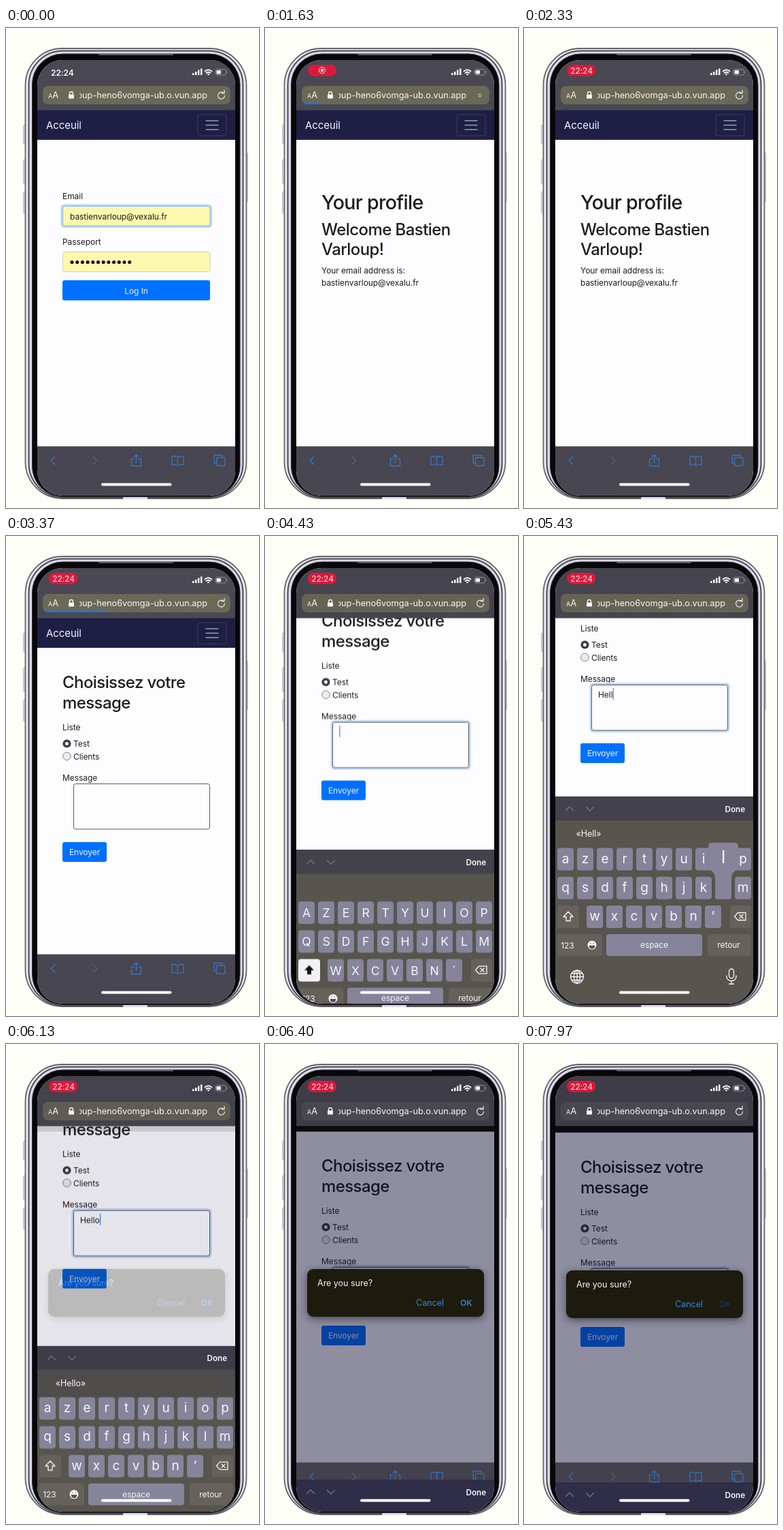
Write an HTML page that moves like this. It is 372 px wide and 704 px high and loops after 8 s.

```html
<!DOCTYPE html>
<html lang="fr">
<head>
<meta charset="utf-8">
<title>Phone demo</title>
<style>
html, body { margin: 0; height: 100%; overflow: hidden; background: #fffffa; }
svg { display: block; width: 100vw; height: 100vh; }
text { font: 12px Inter, "Open Sans", sans-serif; letter-spacing: -.005em; fill: #1e1d1a; }
.h1 { font-size: 28.6px; font-weight: 500; letter-spacing: -.025em; }
.h2 { font-size: 24px; font-weight: 500; letter-spacing: -.024em; }
.white { fill: #f6f5fa; }
.mid { text-anchor: middle; }
.end { text-anchor: end; }
.blue { fill: #3584e4; }
.line { fill: none; stroke-width: 1.3; stroke-linecap: round; stroke-linejoin: round; }
.key { fill: #86849a; }
.dark { fill: #64625a; }
.cap { font-size: 17.5px; text-anchor: middle; }
.low { font-size: 19px; }
.a { animation: 8s linear infinite; }
#head { animation-name: head; }
#pill { animation-name: pill; }
#page { animation-name: scroll; }
#keyboard { animation-name: slide; }
#bar { animation-name: load; }
.fade { animation-name: fade; }
#dialog { animation-name: fade, settle; }
@keyframes scroll {
  0%, 53.1% { transform: translateY(0); animation-timing-function: ease-in; }
  55.375% { transform: translateY(-90px); animation-timing-function: ease-out; }
  58.5%, 75.6% { transform: translateY(-145px); }
  80% { transform: translateY(-36px); }
  82%, 100% { transform: translateY(-34px); }
}
@keyframes slide {
  0%, 53.1% { transform: translateY(322px); }
  55.375% { transform: translateY(79px); animation-timing-function: ease-out; }
  58.5%, 75.6% { transform: translateY(0); }
  80% { transform: translateY(257px); }
  82%, 100% { transform: translateY(261px); }
}
@keyframes settle {
  0%, 80% { transform: translateY(-2px); }
  82%, 100% { transform: translateY(0); }
}
@keyframes fade {
  0%, 76% { opacity: 0; }
  79%, 100% { opacity: 1; }
}
@keyframes head {
  0%, 53.1% { fill: #4a4852; }
  55.375%, 76% { fill: #45434d; }
  79%, 100% { fill: #3e3c47; }
}
@keyframes pill {
  0%, 53.1% { fill: #6a6856; }
  55.375%, 76% { fill: #656354; }
  79%, 100% { fill: #494851; }
}
@keyframes load {
  0%, 17.49% { width: 0; opacity: 0; }
  17.5% { width: 8px; opacity: 1; }
  20.375% { width: 25px; }
  25% { width: 268px; opacity: 1; }
  26%, 38.74% { width: 268px; opacity: 0; }
  38.75% { width: 20px; opacity: 1; }
  42.125% { width: 91px; }
  46% { width: 268px; opacity: 1; }
  47%, 100% { width: 268px; opacity: 0; }
}
</style>
</head>
<body>
<svg viewBox="0 0 372 704">
  <defs>
    <clipPath id="screen"><rect x="46" y="47" width="291" height="639" rx="37"/></clipPath>
    <clipPath id="view"><rect x="46" y="120.5" width="291" height="493"/></clipPath>
    <clipPath id="address"><rect x="108" y="86" width="190" height="26"/></clipPath>
    <clipPath id="pillClip"><rect x="54" y="85" width="276" height="27" rx="8"/></clipPath>
    <filter id="shadow" x="-20%" y="-50%" width="140%" height="200%"><feGaussianBlur stdDeviation="6"/></filter>
  </defs>

  <g id="frame">
    <g fill="#d6d5de" stroke="#a3a2ac" stroke-width=".6">
      <rect x="25.500" y="142" width="3" height="28" rx="1"/>
      <rect x="25.500" y="193" width="3" height="35" rx="1"/>
      <rect x="25.500" y="240" width="3" height="32" rx="1"/>
      <rect x="352.500" y="183" width="3" height="72" rx="1"/>
    </g>
    <rect x="28.500" y="30" width="325" height="660" rx="54" fill="#eeedf4" stroke="#65645f" stroke-width="1.800"/>
    <rect x="33.500" y="33.500" width="315" height="655" rx="50" fill="#d9d8e4" stroke="#4a495a" stroke-width="2"/>
    <rect x="38.500" y="38" width="305.500" height="649.500" rx="45" fill="#08080a" stroke="#2c2b33"/>
    <rect x="136" y="38" width="110" height="2" rx="1" fill="#5c5b60"/>
    <rect x="172" y="688" width="36" height="3" rx="1" fill="#dddcee"/>
  </g>

  <g clip-path="url(#screen)">
    <rect x="46" y="47" width="291" height="639" fill="#fdfcfe"/>

    <g clip-path="url(#view)">
      <g id="page" class="a">
        <rect x="46" y="120" width="291" height="44" fill="#1f1f45"/>
        <text class="white" x="59" y="147.500" style="font-size:15px">Acceuil</text>
        <rect x="282" y="127" width="42" height="31" rx="3" fill="none" stroke="#3d3c58"/>
        <path class="line" stroke="#9c9bab" d="M294 136h18m-18 6.500h18m-18 6.500h18"/>

        <g data-on="0-1400">
          <text x="83" y="250.500">Email</text>
          <rect x="82" y="260" width="219.500" height="31.500" rx="4" fill="none" stroke="#b5d6fb" stroke-width="3"/>
          <rect x="83.500" y="261.500" width="216.500" height="28.500" rx="3" fill="#fcf9ae" stroke="#86b8f4"/>
          <text x="94" y="280.500">bastienvarloup@vexalu.fr</text>
          <text x="83" y="317.500">Passeport</text>
          <rect x="83.500" y="328.500" width="216.500" height="29" rx="3" fill="#fcf9ae" stroke="#d0cfc0"/>
          <g id="dots"></g>
          <rect x="83" y="370" width="217" height="29.500" rx="3" fill="#0070ff"/>
          <text class="white mid" x="191.500" y="389.500">Log In</text>
        </g>

        <g data-on="1400-3100">
          <text class="h1" x="83" y="265.500">Your profile</text>
          <text class="h2" x="83" y="303.500">Welcome Bastien</text>
          <text class="h2" x="83" y="333">Varloup!</text>
          <text x="83" y="359.500">Your email address is:</text>
          <text x="83" y="378">bastienvarloup@vexalu.fr</text>
        </g>

        <g data-on="3100-8000">
          <text class="h2" x="83" y="223">Choisissez votre</text>
          <text class="h2" x="83" y="252.500">message</text>
          <text x="83" y="284.500">Liste</text>
          <circle cx="89.500" cy="304.500" r="4.300" fill="#fff" stroke="#3d3c48" stroke-width="3.600"/>
          <text x="99" y="309">Test</text>
          <circle cx="89.500" cy="323" r="5.800" fill="#ecebf0" stroke="#77767e" stroke-width=".9"/>
          <text x="99" y="327.500">Clients</text>
          <text x="83" y="358.500">Message</text>
          <rect data-on="4200-8000" x="98" y="362" width="203" height="69.500" rx="4" fill="none" stroke="#bcd6f8" stroke-width="3"/>
          <rect x="99.500" y="363.500" width="200" height="66.500" rx="3" fill="#fdfcfe" stroke="#5b5a68"/>
          <g id="typed"></g>
          <rect x="83" y="449" width="65" height="29" rx="3" fill="#0070ff"/>
          <text class="white mid" x="115.500" y="468">Envoyer</text>
        </g>
      </g>
    </g>

    <rect id="head" class="a" x="46" y="47" width="291" height="73.500"/>
    <text data-on="0-450" class="white" x="66" y="69.500" style="font-weight:600">22:24</text>
    <g data-on="450-8000">
      <rect x="63" y="54" width="42" height="16.500" rx="8" fill="#dc193c"/>
      <g data-on="450-2300">
        <circle cx="84" cy="62" r="4.500" fill="none" stroke="#fbe4e8"/>
        <circle cx="84" cy="62" r="2.200" fill="#fbe4e8"/>
      </g>
      <text data-on="2300-8000" x="84.500" y="66.500" class="mid" style="fill:#fbe4e8">22:24</text>
    </g>
    <path d="M274 66h2.500v3h-2.500zM278 64h2.500v5h-2.500zM282 61.500h2.500v7.500h-2.500zM286 59.500h2.500v9.500h-2.500z" fill="#f6f5fa"/>
    <path d="M292.500 63.500q5-4.500 10 0M294.500 66q3-2.500 6 0" class="line" stroke="#f6f5fa" style="stroke-width:1.700"/>
    <circle cx="297.500" cy="68" r="1.300" fill="#f6f5fa"/>
    <rect x="308" y="60.500" width="15.500" height="8.500" rx="2.500" fill="none" stroke="#8d8c94"/>
    <rect x="309.500" y="62" width="6.500" height="5.500" rx="1" fill="#f6f5fa"/>
    <path d="M325 63.500v2.500" stroke="#8d8c94"/>

    <rect id="pill" class="a" x="54" y="85" width="276" height="27" rx="8"/>
    <text class="white" x="62" y="103"><tspan style="font-size:9px">A</tspan><tspan style="font-size:13px">A</tspan></text>
    <path d="M93.500 98v-2a2.500 2.500 0 0 1 5 0v2" class="line" stroke="#f6f5fa"/>
    <rect x="92" y="97.500" width="8" height="6" rx="1" fill="#f6f5fa"/>
    <g clip-path="url(#address)">
      <text class="white end" x="296" y="103" style="font-size:12.800px">bastien-varloup-heno6vomga-ub.o.vun.app</text>
    </g>
    <g class="line" stroke="#e4e3e6">
      <path data-on="0-1400" d="M320.500 96a5 5 0 1 0 1 3.500M317 95.500h4v-4"/>
      <path data-on="1400-1900" d="M317.500 97.500a2 2 0 1 0 .5 1.500" stroke="#b5b4ac"/>
      <path data-on="1900-8000" d="M320.500 96a5 5 0 1 0 1 3.500M317 95.500h4v-4"/>
    </g>
    <g clip-path="url(#pillClip)">
      <rect id="bar" class="a" x="58" y="109.500" width="0" height="2.500" fill="#2273dc"/>
    </g>

    <rect x="46" y="613.500" width="291" height="73" fill="#484650"/>
    <g class="line" stroke="#3676c4">
      <path d="M72 629l-6 5.500 6 5.500"/>
      <path d="M128 629l6 5.500-6 5.500" stroke="#62615d"/>
      <path d="M188 632h-3.500v10.500h14v-10.500h-3.500M191.500 637.500v-11M188.500 629l3-3 3 3"/>
      <path d="M252.500 630q-4-3-8.500-1.500v12.500q4.500-1.500 8.500 1 4-2.500 8.500-1v-12.500q-4.500-1.500-8.500 1.500zv12"/>
      <path d="M309 638h-3v-11.500h12v3"/>
      <rect x="309.500" y="630" width="12.500" height="12" rx="2"/>
    </g>

    <g class="a fade">
      <rect x="46" y="120.500" width="291" height="493" fill="#0a0a32" opacity=".45"/>
      <rect x="46" y="613.500" width="291" height="73" fill="#0a0a20" opacity=".06"/>
      <rect x="46" y="120.500" width="291" height="8" fill="#0c0b0a"/>
    </g>

    <g id="dialog" class="a">
      <rect x="62" y="335" width="260" height="70" rx="9" fill="#151422" opacity=".6" filter="url(#shadow)"/>
      <rect x="62" y="332" width="260" height="70" rx="9" fill="#1d1b0d"/>
      <text class="white" x="77" y="356.500" style="font-size:12.600px">Are you sure?</text>
      <text class="blue" x="222" y="386" style="font-size:12.600px">Cancel</text>
      <text class="blue" data-on="0-7870" x="287" y="386" style="font-weight:600">OK</text>
      <text data-on="7870-8000" x="287" y="386" style="font-weight:600;fill:#1f3357">OK</text>
    </g>

    <g id="keyboard" class="a">
      <rect x="46" y="382" width="291" height="330" fill="#57554d"/>
      <rect x="46" y="382" width="291" height="35" fill="#43414b"/>
      <rect class="a fade" x="46" y="382" width="291" height="75" fill="#2f2d48"/>
      <path class="line" stroke="#77767c" d="M61.500 402.500l5.500-5.500 5.500 5.500M91.500 397.500l5.500 5.500 5.500-5.500"/>
      <text class="white end" x="325" y="404.500" style="font-weight:600;font-size:11.700px">Done</text>
      <g id="keys"></g>
      <g data-on="0-4900">
        <rect x="49" y="542" width="32" height="33" rx="4" fill="#f1f0f5"/>
        <path d="M65 551l7 7.500h-4v6h-6v-6h-4z" fill="#111"/>
      </g>
      <g data-on="4900-8000">
        <rect class="dark" x="49" y="542" width="32" height="33" rx="4"/>
        <path class="line" stroke="#f6f5fa" d="M65 551l7 7.500h-4v6h-6v-6h-4z"/>
      </g>
      <rect class="dark" x="303" y="542" width="31" height="33" rx="4"/>
      <path class="line" stroke="#f6f5fa" d="M309.500 558l5-5.500h11.500v11h-11.500zM317 555.500l5 5m0-5l-5 5"/>
      <rect class="dark" x="49" y="584" width="66" height="32" rx="4"/>
      <rect class="key" x="121" y="584" width="141" height="32" rx="4"/>
      <rect class="dark" x="270" y="584" width="64" height="32" rx="4"/>
      <text class="white mid" x="64" y="604.500">123</text>
      <text class="white mid" x="191.500" y="604">espace</text>
      <text class="white mid" x="301" y="604">retour</text>
      <circle cx="100" cy="600" r="6.500" fill="#f6f5fa"/>
      <path d="M96 601h8a4 4 0 0 1-8 0zM97 597.500h1.500m3 0h1.500" fill="#55534f" stroke="#55534f"/>
      <g class="line" stroke="#f6f5fa">
        <circle cx="78" cy="646.500" r="9.500"/>
        <ellipse cx="78" cy="646.500" rx="4.500" ry="9.500"/>
        <path d="M78 637v19M68.500 646.500h19M70.500 641.500h15m-15 10h15"/>
        <rect x="301.500" y="635" width="7" height="13.500" rx="3.500"/>
        <path d="M298 645v1.500a7 6 0 0 0 14 0v-1.500M305 652.500v4.500m-3.500 0h7"/>
      </g>
      <g id="popups"></g>
    </g>

    <rect x="140" y="667.500" width="103.500" height="4" rx="2" fill="#fff"/>
  </g>
</svg>
<script>
const LOOP = 8000;
const CAPS_END = 4900;
const rows = ['azertyuiop', 'qsdfghjklm', 'wxcvbn'];
const strokes = [['H', 4800], ['e', 4990], ['l', 5200], ['l', 5400], ['o', 5600]];
const fill = (id, html) => { document.getElementById(id).innerHTML = html; };
const span = (from, to) => `data-on="${from}-${to}"`;

function keyAt(char) {
  const row = rows.findIndex(r => r.includes(char.toLowerCase()));
  const col = rows[row].indexOf(char.toLowerCase());
  return { x: (row === 2 ? 104 : 61) + 29 * col, y: 457.5 + 42.3 * row };
}

fill('dots', Array.from({ length: 12 }, (_, i) =>
  `<circle cx="${97 + 7.7 * i}" cy="343.500" r="2.500"/>`).join(''));

const keyHtml = (x, y, upper, lower) => `
  <rect class="key" x="${x - 12}" y="${y}" width="24" height="33" rx="4"/>
  <text class="white cap" x="${x}" y="${y + 23}" ${span(0, CAPS_END)}>${upper}</text>
  <text class="white cap low" x="${x}" y="${y + 22}" ${span(CAPS_END, LOOP)}>${lower}</text>`;
fill('keys', [...rows.join('')].map(c => {
  const { x, y } = keyAt(c);
  return keyHtml(x, y, c.toUpperCase(), c);
}).join('') + keyHtml(278, keyAt('n').y, '´', '’'));

fill('popups', strokes.map(([char, t]) => {
  const { x, y } = keyAt(char);
  return `<g ${span(t, t + 110)}>
    <path class="key" d="M${x - 16} ${y - 50}h32q6 0 6 6v27q0 5-5 9t-5 10v26q0 4-4 4h-16q-4 0-4-4v-26q0-6-5-10t-5-9v-27q0-6 6-6z"/>
    <text class="white cap" x="${x}" y="${y - 20}" style="font-size:26px">${char}</text></g>`;
}).join(''));

// Each stage of the typed word lasts until the next key press.
let word = '';
let typed = '';
let hints = '';
[['', 4200], ...strokes].forEach(([char, from], i) => {
  const to = i < strokes.length ? strokes[i][1] : LOOP;
  word += char;
  typed += `<text x="109" y="382" ${span(from, to)}>${word}<tspan dx="-1.5" fill="#2878e8" style="font-size:14px">|</tspan></text>`;
  if (word) hints += `<text class="white mid" x="95" y="441" style="font-size:12.500px" ${span(from, to)}>«${word}»</text>`;
});
fill('typed', typed);
document.getElementById('keys').insertAdjacentHTML('beforeend', hints);

document.querySelectorAll('[data-on]').forEach(el => {
  const [from, to] = el.dataset.on.split('-').map(Number);
  const at = (ms, opacity) => ({ offset: ms / LOOP, opacity, easing: 'step-end' });
  const frames = [at(0, from ? 0 : 1), at(from, 1), at(to, to < LOOP ? 0 : 1)];
  if (to < LOOP) frames.push(at(LOOP, 0));
  el.animate(frames, { duration: LOOP, iterations: Infinity });
});
</script>
</body>
</html>
```
